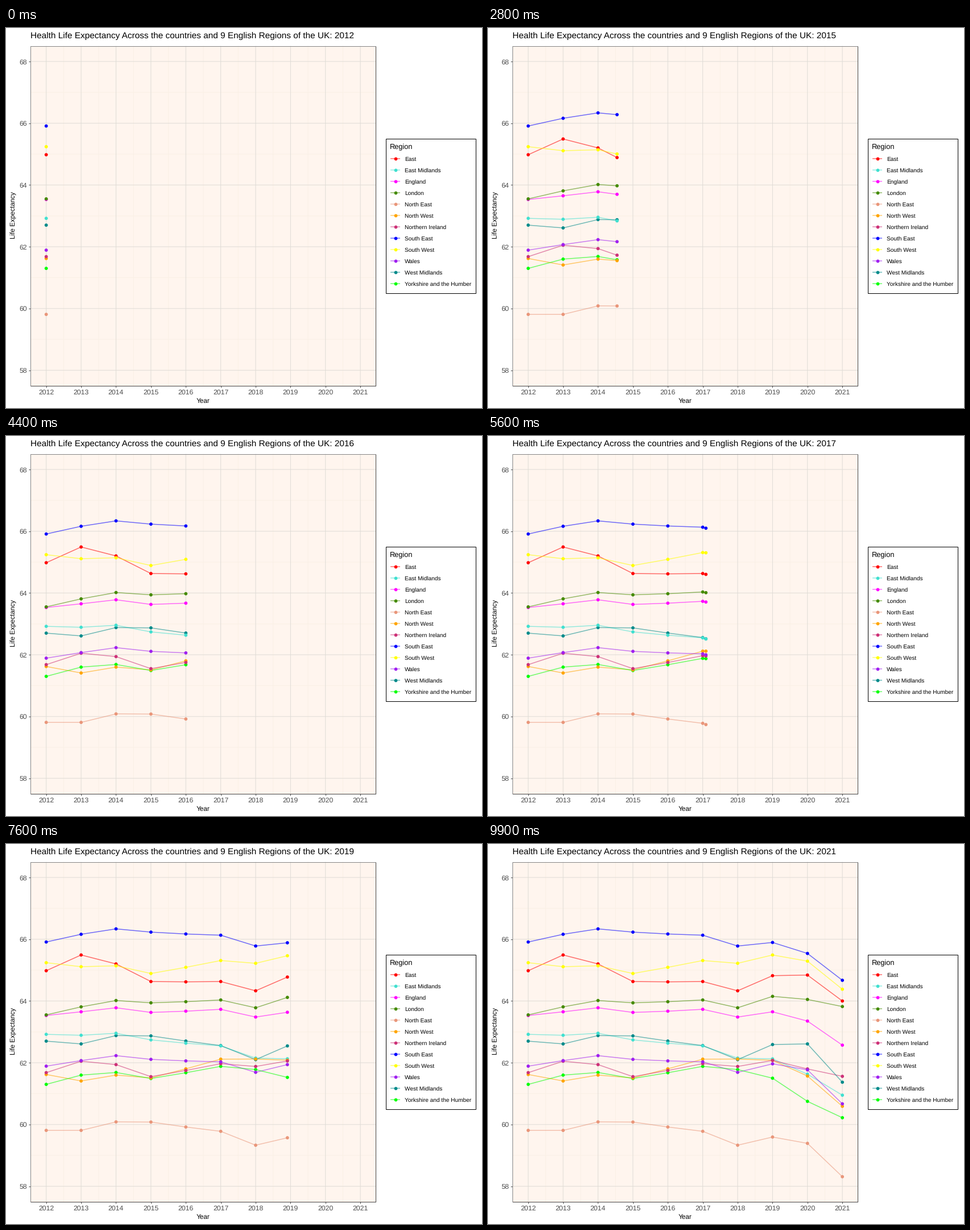
Write a matplotlib script that moves like this. It is 837 px wide and 669 px high and loops after 10000 ms.

```python
import numpy as np
import matplotlib.pyplot as plt
from matplotlib.animation import FuncAnimation
from matplotlib.patches import Rectangle

W, H, DPI = 837, 669, 64
PT = 72 / DPI
FRAMES, INTERVAL = 100, 100
LEFT, RIGHT, TOP, BOTTOM = 43.2, 650.4, 31.7, 629.8
DOT, STROKE, ALPHA = 5.8, 1.5, 0.57
YEARS = np.arange(2012, 2022)

plt.rcParams["font.family"] = ["Liberation Sans", "DejaVu Sans"]
plt.rcParams["text.hinting"] = "none"

# Every region follows the national curve plus a gap that bends at a few years
NATIONAL = [63.53, 63.65, 63.78, 63.63, 63.67, 63.73, 63.48, 63.65, 63.35, 62.57]
BENDS = [2012, 2013, 2015, 2018, 2020, 2021]
REGIONS = {
    "East": ("red", [1.45, 1.84, 1.0, 0.85, 1.49, 1.43]),
    "East Midlands": ("turquoise", [-0.61, -0.76, -0.89, -1.33, -1.72, -1.62]),
    "England": ("magenta", [0] * 6),
    "London": ("#458b00", [0.02, 0.16, 0.31, 0.3, 0.7, 1.25]),
    "North East": ("darksalmon", [-3.72, -3.84, -3.55, -4.15, -3.96, -4.26]),
    "North West": ("orange", [-1.91, -2.24, -2.12, -1.36, -1.78, -1.98]),
    "Northern Ireland": ("#cd3278", [-1.85, -1.6, -2.08, -1.6, -1.55, -1.01]),
    "South East": ("blue", [2.38, 2.51, 2.6, 2.3, 2.19, 2.1]),
    "South West": ("yellow", [1.71, 1.46, 1.26, 1.74, 1.94, 1.81]),
    "Wales": ("#a020f0", [-1.64, -1.58, -1.52, -1.79, -1.58, -1.9]),
    "West Midlands": ("darkcyan", [-0.83, -1.04, -0.76, -1.38, -0.74, -1.2]),
    "Yorkshire and the Humber": ("lime", [-2.23, -2.05, -2.14, -1.7, -2.6, -2.35]),
}
COLOR = {name: color for name, (color, _) in REGIONS.items()}
VALUES = {name: NATIONAL + np.interp(YEARS, BENDS, gap)
          for name, (_, gap) in REGIONS.items()}

# Stacking of the dots, bottom to top
STACK = ["England", "East", "South West", "South East", "London", "West Midlands",
         "East Midlands", "Yorkshire and the Humber", "North West", "North East",
         "Northern Ireland", "Wales"]


def px(year):
    return 70.7 + 61.38 * (np.asarray(year) - 2012)


def py(value):
    return 58.9 + 54.37 * (68 - np.asarray(value))


fig = plt.figure(figsize=(W / DPI, H / DPI), dpi=DPI, facecolor="white")
ax = fig.add_axes([0, 0, 1, 1])
ax.set_xlim(0, W)
ax.set_ylim(H, 0)
ax.axis("off")


def line(x, y, color, width=1.0, z=1, **kw):
    return ax.plot(x, y, color=color, lw=width * PT, zorder=z,
                   solid_capstyle="butt", **kw)[0]


def label(x, y, text, size, color="black", **kw):
    return ax.text(x, y, text, fontsize=size * PT, color=color, va="baseline", **kw)


def box(x0, y0, x1, y1, **kw):
    ax.add_patch(Rectangle((x0, y0), x1 - x0, y1 - y0, **kw))


def dots(x, y, color, z):
    return ax.scatter(x, y, s=(DOT * PT) ** 2, c=color, linewidths=0, zorder=z)


def grid(xs, ys, color, z):
    for x in xs:
        line([x, x], [TOP, BOTTOM], color, z=z, snap=False)
    for y in ys:
        line([LEFT, RIGHT], [y, y], color, z=z, snap=False)


def draw_panel():
    box(LEFT, TOP, RIGHT, BOTTOM, fc="#fff5ee", ec="none", zorder=0)
    grid(px(YEARS[:-1] + 0.5), py(np.arange(59, 68, 2)), "#faf0e6", 1)
    grid(px(YEARS), py(np.arange(58, 69, 2)), "#dfdcd6", 2)
    line([LEFT, LEFT, RIGHT], [BOTTOM, TOP, TOP], "#858585", z=6)
    line([LEFT, RIGHT, RIGHT], [BOTTOM, BOTTOM, TOP], "#444444", z=6)
    for year in YEARS:
        x = px(year)
        line([x, x], [BOTTOM, BOTTOM + 3.6], "#444444")
        label(x, 644.8, str(year), 12.2, "#4d4d4d", ha="center")
    for value in range(58, 69, 2):
        y = py(value)
        line([LEFT - 3.6, LEFT], [y, y], "#444444")
        label(37.3, y + 4.5, str(value), 12.2, "#4d4d4d", ha="right")
    label(346.8, 660.1, "Year", 11.75, ha="center")
    label(16.6, 329.2, "Life Expectancy", 11.75, ha="center",
          rotation=90, rotation_mode="anchor")


def draw_legend():
    box(668, 195, 826, 467, fc="white", ec="black", lw=PT)
    label(674.8, 212.8, "Region", 12.75)
    for i, (name, color) in enumerate(COLOR.items()):
        y = 229.7 + 20.06 * i
        line([676.5, 692.6], [y, y], color, STROKE, alpha=ALPHA)
        dots([684.6], [y], color, 3)
        label(700.8, y + 3.8, name, 10.18)


draw_panel()
draw_legend()
title = label(43, 18.1, "", 15.35)
trails = {name: line([], [], color, STROKE, 3, alpha=ALPHA)
          for name, color in COLOR.items()}
points = dots([], [], None, 4)


def update(i):
    now = 2012 + 9 * i / (FRAMES - 1)
    past = YEARS[YEARS < now - 1e-6]
    years = np.append(past, now)
    xs = px(years)
    ys = {name: py(np.interp(years, YEARS, v)) for name, v in VALUES.items()}
    for name, trail in trails.items():
        trail.set_data(xs, ys[name])
    points.set_offsets([xy for n in STACK for xy in zip(xs, ys[n])])
    points.set_facecolor([COLOR[n] for n in STACK for _ in xs])
    title.set_text("Health Life Expectancy Across the countries and 9 English "
                   f"Regions of the UK: {round(now)}")
    return [*trails.values(), points, title]


anim = FuncAnimation(fig, update, frames=FRAMES, interval=INTERVAL,
                     repeat=True, repeat_delay=0, blit=False)
plt.show()
```
